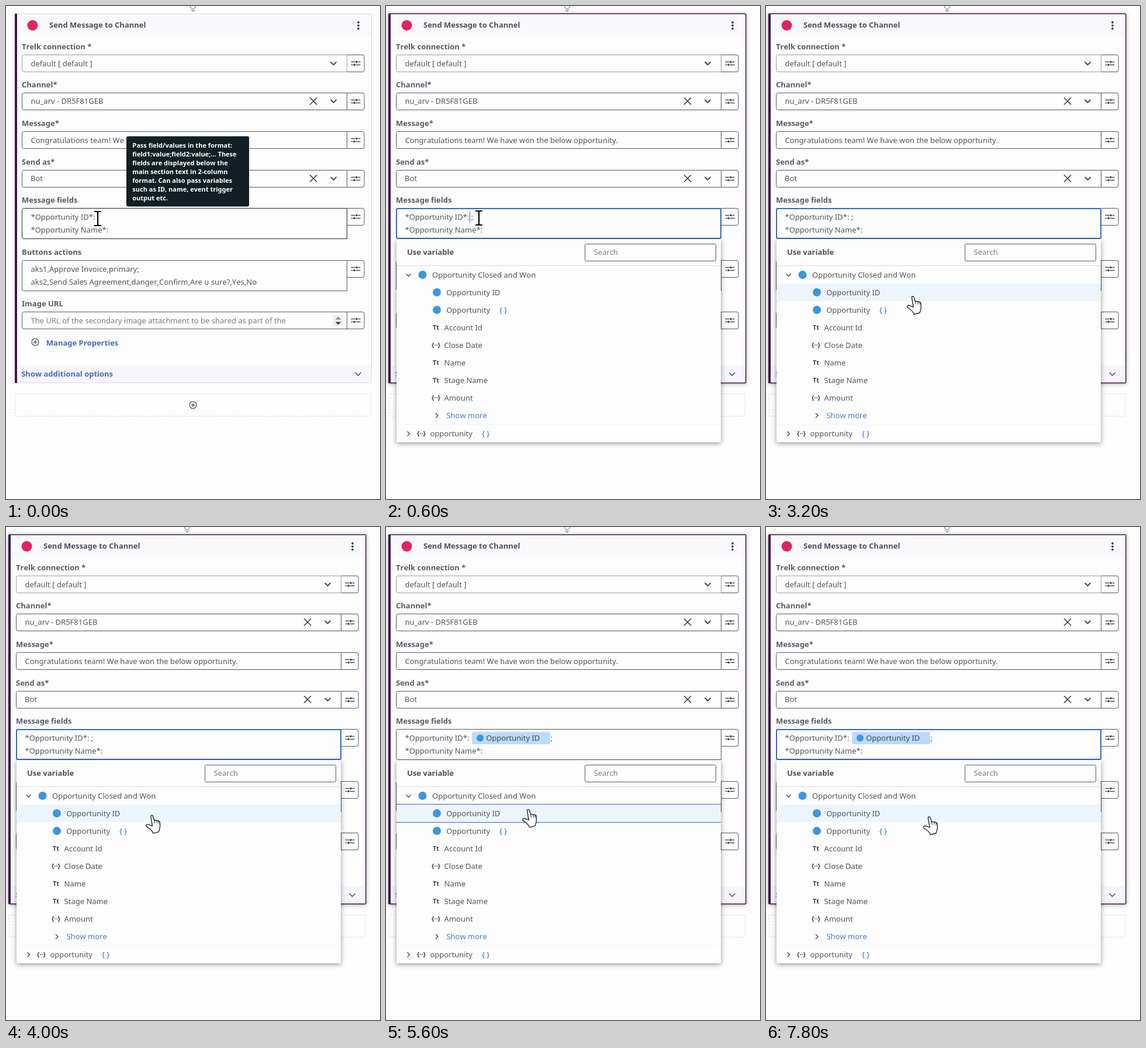
Animation of 640 by 842 pixels, one loop 8000 ms. Source, as an HTML page with a canvas:

```html
<!DOCTYPE html>
<html lang="en">
<head>
<meta charset="utf-8">
<title>Message fields</title>
<style>
  html, body { margin: 0; width: 100%; height: 100%; overflow: hidden; background: #fdfdfd; }
  canvas { display: block; width: 640px; height: 842px; }
</style>
</head>
<body>
<canvas id="stage"></canvas>
<script>
const W = 640, H = 842, LOOP = 8000, STEP = 200;
const INK = '#4f555d', DARK = '#3d434a', LINE = '#555a61', BLUE = '#446dc0',
      FOCUS = '#2f6bc5', PAPER = '#fdfdfd', CLOUD = '#3c97dc', PLUM = '#3d1743';

const canvas = document.getElementById('stage');
const c = canvas.getContext('2d');
const dpr = window.devicePixelRatio || 1;
canvas.width = W * dpr;
canvas.height = H * dpr;
c.fontKerning = 'none';

// ---- drawing helpers ----
function text(s, x, mid, color = INK, weight = 400, size = 13) {
  c.font = `${weight} ${size}px "Noto Sans", "Open Sans", sans-serif`;
  c.fillStyle = color;
  c.fillText(s, x, Math.round(mid + size * 0.388));
}

function rect(x, y, w, h, color) {
  c.fillStyle = color;
  c.fillRect(x, y, w, h);
}

function box(x, y, w, h, r, { fill, stroke, width = 1 }) {
  c.beginPath();
  c.roundRect(x, y, w, h, r);
  if (fill) { c.fillStyle = fill; c.fill(); }
  if (stroke) { c.strokeStyle = stroke; c.lineWidth = width; c.stroke(); }
}

function line(points, color = DARK, width = 1.7) {
  c.beginPath();
  points.forEach(([x, y], i) => i ? c.lineTo(x, y) : c.moveTo(x, y));
  c.strokeStyle = color;
  c.lineWidth = width;
  c.stroke();
}

function dot(x, y, r, color) {
  c.beginPath();
  c.arc(x, y, r, 0, Math.PI * 2);
  c.fillStyle = color;
  c.fill();
}

function triangle(x, y, up, color) {
  const h = up ? -5 : 5;
  c.beginPath();
  c.moveTo(x - 5, y);
  c.lineTo(x + 5, y);
  c.lineTo(x, y + h);
  c.fillStyle = color;
  c.fill();
}

const chevronDown = (x, y, s = 5, width = 1.8) =>
  line([[x - s, y - s / 2], [x, y + s / 2], [x + s, y - s / 2]], DARK, width);

const chevronRight = (x, y) =>
  line([[x - 2, y - 4], [x + 2, y], [x - 2, y + 4]], DARK, 1.3);

function cross(x, y) {
  line([[x - 6, y - 6], [x + 6, y + 6]]);
  line([[x + 6, y - 6], [x - 6, y + 6]]);
}

function plusCircle(x, y) {
  c.beginPath();
  c.arc(x, y, 6, 0, Math.PI * 2);
  c.strokeStyle = DARK;
  c.lineWidth = 1.1;
  c.stroke();
  line([[x - 3.5, y], [x + 3.5, y]], DARK, 1.2);
  line([[x, y - 3.5], [x, y + 3.5]], DARK, 1.2);
}

function withShadow(color, blur, dy, draw) {
  c.save();
  c.shadowColor = color;
  c.shadowBlur = blur * dpr;
  c.shadowOffsetY = dy * dpr;
  draw();
  c.restore();
}

// ---- form ----
function mapButton(y) {
  box(573.5, y, 29.5, 29, [0, 3, 3, 0], { fill: PAPER, stroke: LINE });
  const x = 588.5, m = y + 14.5;
  line([[x - 8, m - 2.5], [x - 1, m - 2.5]], DARK, 1.4);
  line([[x + 4, m - 2.5], [x + 8, m - 2.5]], DARK, 1.4);
  dot(x + 1.5, m - 2.5, 1.8, DARK);
  line([[x - 8, m + 2.5], [x - 5, m + 2.5]], DARK, 1.4);
  line([[x, m + 2.5], [x + 8, m + 2.5]], DARK, 1.4);
  dot(x - 2.5, m + 2.5, 1.8, DARK);
}

function field(label, y, h, { stroke = LINE, focused = false } = {}) {
  text(label, 17, y - 14.5, '#575d66', 600);
  mapButton(y);
  if (focused) box(18, y + 0.5, 555, h - 1, 2, { fill: PAPER, stroke: FOCUS, width: 2 });
  else box(17.5, y, 556, h, [3, 0, 0, 3], { fill: PAPER, stroke });
}

function card(s) {
  if (s.selected) {
    withShadow('rgba(60,40,70,.45)', 7, 1, () => rect(4, 13, 612, 631, PAPER));
    box(4.75, 13.25, 611, 630.5, 1, { stroke: '#45204c', width: 1.5 });
  } else {
    box(5.5, 13.5, 610, 630, 1, { fill: PAPER, stroke: '#dadbe0' });
  }
  rect(8, 14, 607, 37, '#f9f9fc');
  rect(8, 614, 607, 29, '#f5f5fb');
  rect(s.shift ? 5 : 4, 13, 4, 631, PLUM);

  dot(35.5, 33, 9, '#e0245e');
  text('Send Message to Channel', 64, 32, '#4b515a', 600);
  for (const y of [28, 33.3, 38.6]) dot(593, y, 1.9, DARK);
}

function messageFields(s) {
  field('Message fields', 345.5, 52, {
    focused: s.focused,
    stroke: s.t < STEP ? '#25282c' : LINE,
  });
  if (s.chip) {
    text('*Opportunity ID*:', 32.5, 360);
    box(147, 350, 134, 21, 3, { fill: '#bddafa' });
    dot(161, 360.5, 6, CLOUD);
    text('Opportunity ID', 171.2, 360, '#3f4c5c');
    text(';', 281.5, 360);
  } else {
    text('*Opportunity ID*: ;', 32.5, 360);
  }
  text('*Opportunity Name*:', 32.5, 382);
  if (s.caret) rect(s.caret[0], s.caret[1], 1, 19, FOCUS);
}

function form(s) {
  c.save();
  c.translate(s.shift, 0);

  c.beginPath();
  c.arc(310, 0, 4.5, 0, Math.PI);
  c.strokeStyle = '#777c82';
  c.lineWidth = 1.2;
  c.stroke();
  line([[310, 4], [310, 9]], '#999da2', 1.2);
  line([[306.5, 6], [310, 9.5], [313.5, 6]], '#999da2', 1.2);

  card(s);

  field('Trelk connection *', 83.5, 29, { stroke: '#9a9da2' });
  text('default [ default ]', 32.5, 98);
  chevronDown(550.5, 98);

  field('Channel*', 148.5, 29);
  text('nu_arv - DR5F81GEB', 32.5, 162);
  cross(516, 162.5);
  chevronDown(550.5, 162.5);

  field('Message*', 214.5, 29);
  text('Congratulations team! We have won the below opportunity.', 32.5, 229);

  field('Send as*', 280.5, 29);
  text('Bot', 32, 294);
  cross(516, 294.5);
  chevronDown(550.5, 294.5);

  messageFields(s);

  field('Buttons actions', 434.5, 52);
  text('aks1,Approve Invoice,primary;', 32.5, 449);
  text('aks2,Send Sales Agreement,danger,Confirm,Are u sure?,Yes,No', 32.5, 471);

  field('Image URL', 522.5, 29);
  text('The URL of the secondary image attachment to be shared as part of the', 32.5, 537, '#787d83');
  rect(549, 528, 19, 18, '#efeff0');
  triangle(558.5, 535.5, true, '#8b8e92');
  triangle(558.5, 539.5, false, DARK);

  plusCircle(40, 574);
  text('Manage Properties', 58.8, 575, BLUE, 600);
  text('Show additional options', 16.2, 628, BLUE, 600);
  chevronDown(592.5, 628.5, 5, 1.3);

  c.setLineDash([3, 2]);
  box(5.5, 662.5, 609, 38, 2, { stroke: '#d9dadd' });
  c.setLineDash([]);
  plusCircle(310, 681.5);
  c.restore();
}

function tooltip() {
  box(206, 222.5, 210, 120, 3, { fill: '#141f25' });
  [
    'Pass field/values in the format:',
    'field1:value;field2:value;... These',
    'fields are displayed below the',
    'main section text in 2-column',
    'format. Can also pass variables',
    'such as ID, name, event trigger',
    'output etc.',
  ].forEach((s, i) => text(s, 216.3, 238 + i * 15, '#fff', 700, 11));
}

// ---- variable picker ----
const ROWS = [
  ['cloud', 'Opportunity ID'], ['cloud', 'Opportunity'], ['Tt', 'Account Id'],
  ['{··}', 'Close Date'], ['Tt', 'Name'], ['Tt', 'Stage Name'], ['{··}', 'Amount'],
];

function picker(s) {
  const panel = () => box(18, 398, 555, 347, 2, { fill: PAPER });
  c.save();
  if (s.opening) {
    c.globalAlpha = 0.03;
    c.translate(38, 71);
    c.scale(0.867, 0.867);
    panel();
  } else {
    withShadow('rgba(0,0,0,.42)', 8, 2, panel);
  }

  text('Use variable', 36, 420, '#4b515a', 600);
  box(340.5, 406.5, 224, 29, 2, { fill: PAPER, stroke: LINE });
  text('Search', 355.5, 420, '#777c82');
  rect(18, 443, 555, 1, '#dcdde0');

  if (s.hover >= 0) rect(18, 444 + s.hover * 30, 555, 30, '#eef4fc');
  if (s.rowFocus) {
    rect(18, 473, 555, 1, FOCUS);
    rect(18, 504, 555, 1, FOCUS);
  }

  chevronDown(38.5, 459.5, 4, 1.3);
  dot(62.5, 459, 7, CLOUD);
  text('Opportunity Closed and Won', 79, 459);
  ROWS.forEach(([icon, name], i) => {
    const y = 489 + i * 30;
    if (icon === 'cloud') dot(87, y, 7, CLOUD);
    else text(icon, icon === 'Tt' ? 80 : 78, y, DARK, 600, 11);
    text(name, icon === 'cloud' ? 103.2 : 99.6, y);
  });
  text('{ }', 194, 519, FOCUS);
  chevronRight(87, 699.5);
  text('Show more', 103.4, 699, '#437bc9');
  rect(18, 714, 555, 1, '#f5f5f6');
  chevronRight(38.5, 730.5);
  text('{··}', 53, 730, DARK, 600, 11);
  text('opportunity', 75.4, 730);
  text('{ }', 164, 730, FOCUS);
  c.restore();
}

// ---- pointer ----
const HAND = new Path2D('M-1.5 2.4C-2-.4 1.6-.9 2.3 1.6L4.4 9C6 7.8 8 8 8.6 9.3' +
  'C10 8.4 11.4 8.8 11.9 10.1C13.2 9.6 14 10.4 14.1 12L14.3 18.5C14.2 22 13 24.5 12 28' +
  'L2.5 30.5C1 26-4 22-9 19C-10.5 16.5-8 14.6-5.5 15.6L1.2 18.2Z');
const KNUCKLES = new Path2D('M4.4 9L5.5 13.5M8.6 9.3L9.5 13.5M11.9 10.1L12.5 13.8');
const BEAM = new Path2D('M-6-12H-2Q0-12 0-10Q0-12 2-12H6M0-10V10M-6 12H-2Q0 12 0 10Q0 12 2 12H6');

// time, x, y
const PATH = [
  [0, 157, 363], [400, 157, 363], [600, 159, 362], [2300, 159, 362],
  [3100, 251, 496], [3400, 251, 496], [4500, 248, 490], [5500, 248, 490],
  [6100, 182, 387], [7500, 182, 387], [7800, 279, 495], [8000, 279, 495],
];

function pointerAt(t) {
  const i = PATH.findIndex(p => p[0] > t);
  const [t0, x0, y0] = PATH[i - 1], [t1, x1, y1] = PATH[i];
  const k = (t - t0) / (t1 - t0), e = k * k * (3 - 2 * k);
  return [x0 + (x1 - x0) * e, y0 + (y1 - y0) * e];
}

function pointer([x, y]) {
  c.save();
  c.translate(x, y);
  c.lineJoin = 'round';
  if (y > 398) {
    c.fillStyle = '#fff';
    c.fill(HAND);
    c.strokeStyle = '#24272b';
    c.lineWidth = 1.4;
    c.stroke(HAND);
    c.lineWidth = 1;
    c.stroke(KNUCKLES);
  } else {
    c.strokeStyle = '#fff';
    c.lineWidth = 3.6;
    c.stroke(BEAM);
    c.strokeStyle = '#000';
    c.lineWidth = 2.2;
    c.stroke(BEAM);
  }
  c.restore();
}

// ---- timeline ----
const within = (t, from, to) => t >= from && t < to;

function caretAt(t) {
  if (within(t, 200, 1000)) return [143, 351];
  if (within(t, 1000, 1400) || within(t, 2000, 2400)) return [147, 351];
  if (within(t, 6200, 6600)) return [166, 373];
  if (within(t, 6600, 7200)) return [170, 373];
  return null;
}

function stateAt(t) {
  const tip = pointerAt(t);
  const typing = within(t, 1000, 2400) || within(t, 6600, 7600);
  return {
    t, tip, typing,
    shift: t < 400 ? 10 : 0,
    selected: t >= 600,
    opening: t < 600,
    focused: within(t, 200, 4400) || t >= 6000,
    rowFocus: within(t, 4400, 6000),
    chip: t >= 5000,
    hover: typing ? -1 : Math.floor((tip[1] - 444) / 30),
    caret: caretAt(t),
  };
}

function frame(now) {
  const s = stateAt(Math.floor((now % LOOP) / STEP) * STEP);
  c.setTransform(dpr, 0, 0, dpr, 0, 0);
  rect(0, 0, W, H, PAPER);
  form(s);
  if (s.t >= 400) picker(s);
  if (s.t < 600) tooltip();
  if (!s.typing) pointer(s.tip);
}

const start = performance.now();
function tick() {
  frame(performance.now() - start);
  requestAnimationFrame(tick);
}
tick();
</script>
</body>
</html>
```
